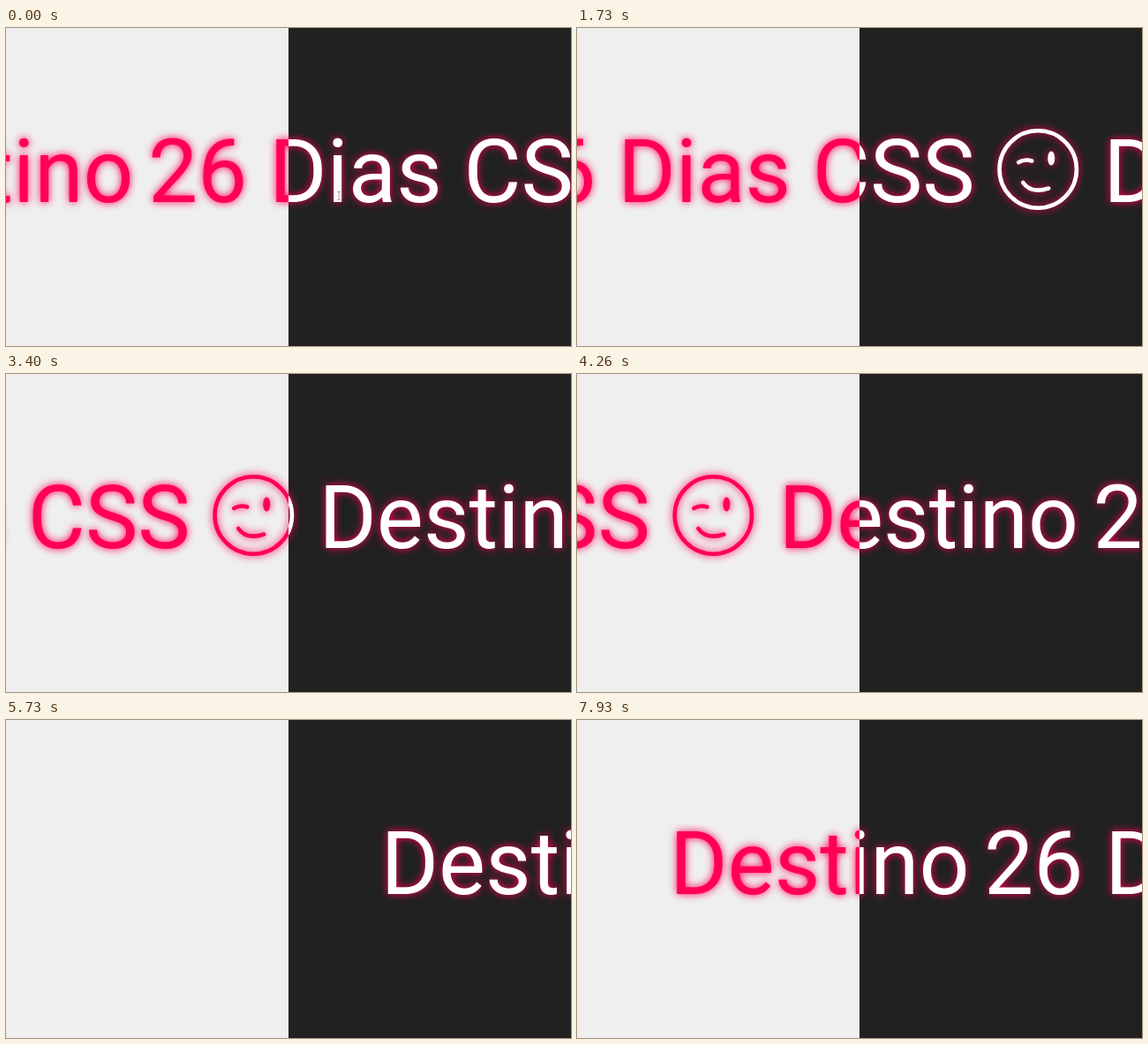
These frames come from a looping animation (640x360 px, 8000 ms). An HTML page with a canvas:

```html
<!DOCTYPE html>
<html lang="pt">
<head>
<meta charset="utf-8">
<style>
  html, body { margin: 0; height: 100%; overflow: hidden; }
  canvas { display: block; width: 640px; height: 360px; }
</style>
</head>
<body>
<canvas id="stage" width="640" height="360"></canvas>
<script>
const ctx = document.getElementById('stage').getContext('2d');
const LOOP = 8000, FPS = 15;
const PINK = '#ff0055';
const BASELINE = 197, COPY_WIDTH = 1043, FACE_X = 969, FACE_Y = 160;
const words = { Destino: 0, 26: 356, Dias: 493, CSS: 713.6 };

// The banner takes 10 s per pass; the loop opens in the middle of one
const PASS = 10000, PASS_OFFSET = 4670, ENTER_X = 483, TRAVEL = 1452;

function bannerX(t) {
  return ENTER_X - TRAVEL * ((t + PASS_OFFSET) % PASS) / PASS;
}

function drawFace(x) {
  ctx.save();
  ctx.translate(x, FACE_Y);
  ctx.lineCap = 'round';
  ctx.lineWidth = 4.6;
  ctx.beginPath();
  ctx.arc(0, 0, 43.7, 0, 2 * Math.PI);
  ctx.stroke();
  ctx.stroke(new Path2D('M-22 -8Q-15 -12 -7 -9.5M-17 15Q-8 28 12 21.5'));
  ctx.beginPath();
  ctx.ellipse(15, -12.5, 4, 8, 0, 0, 2 * Math.PI);
  ctx.fill();
  ctx.restore();
}

function drawHalf(left, background, ink, x) {
  ctx.save();
  ctx.beginPath();
  ctx.rect(left, 0, 320, 360);
  ctx.clip();
  ctx.fillStyle = background;
  ctx.fillRect(left, 0, 320, 360);
  ctx.fillStyle = ctx.strokeStyle = ink;
  ctx.shadowColor = PINK;
  ctx.shadowBlur = 10;
  ctx.font = '100px Roboto, sans-serif';
  for (const start of [x, x + COPY_WIDTH]) {
    for (const word in words) ctx.fillText(word, start + words[word], BASELINE);
    drawFace(start + FACE_X);
  }
  ctx.restore();
}

// A text cursor that turns into an arrow as it leaves the banner
function drawPointer(t) {
  if (t > 1500) return;
  const glide = Math.min(1.2, Math.max(0, (t - 400) / 730));
  ctx.save();
  ctx.translate(377 - 45 * glide, 190 + 33 * glide);
  if (glide < 0.7) {
    ctx.strokeStyle = '#b5a5ac';
    ctx.stroke(new Path2D('M-2 -4.5H2M0 -4.5V4.5M-2 4.5H2'));
  } else {
    const arrow = new Path2D('M0 0V7.5L1.7 6L2.8 8.5L4 8L3 5.5H5.2Z');
    ctx.strokeStyle = '#111';
    ctx.fillStyle = '#fff';
    ctx.stroke(arrow);
    ctx.fill(arrow);
  }
  ctx.restore();
}

function render() {
  const elapsed = performance.now() % LOOP;
  const t = Math.floor((elapsed + 7) * FPS / 1000) * 1000 / FPS % LOOP;
  const x = bannerX(t);
  drawHalf(0, '#efefef', PINK, x);
  drawHalf(320, '#212121', '#fff', x);
  drawPointer(t);
  requestAnimationFrame(render);
}
render();
</script>
</body>
</html>
```
